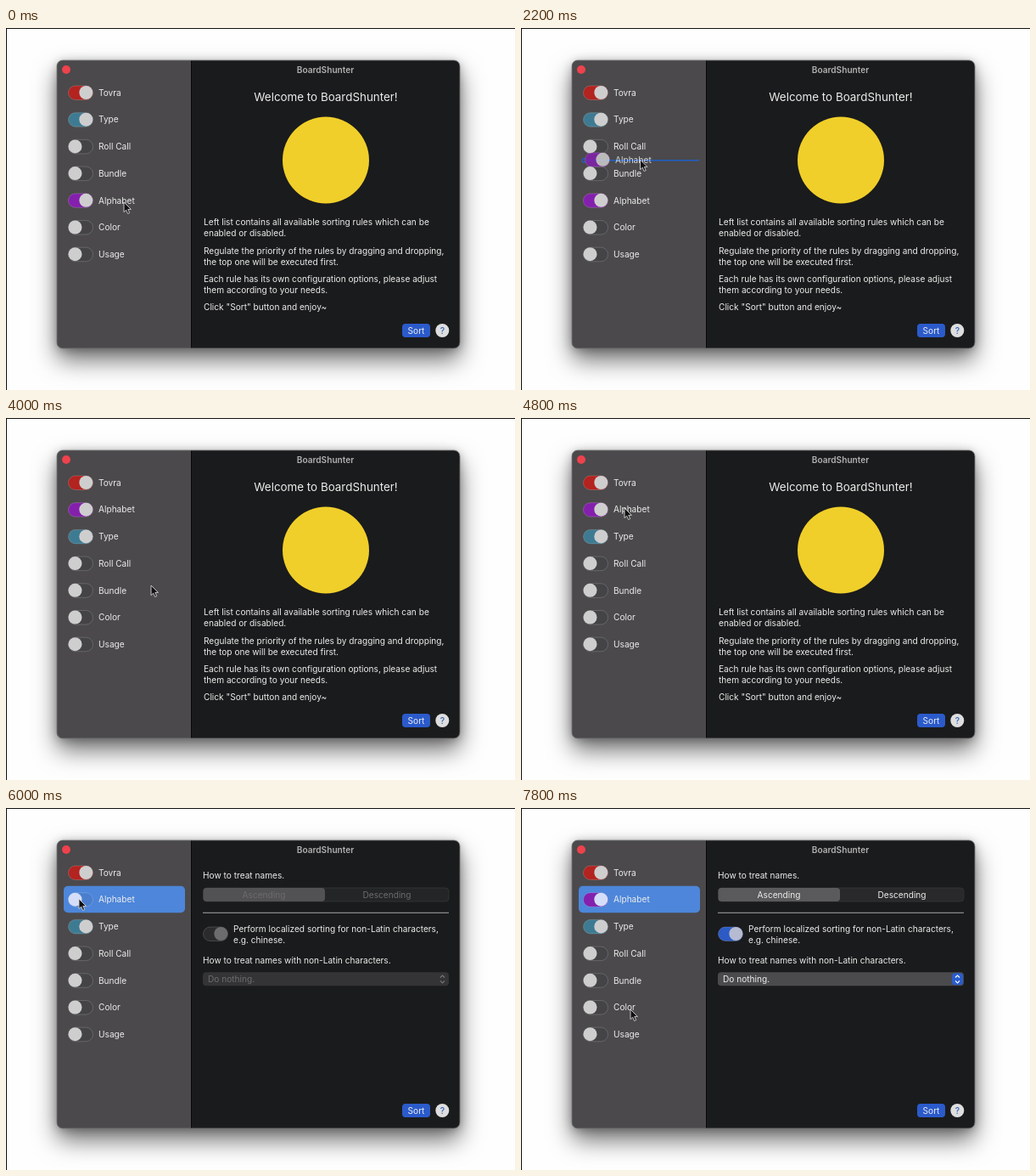
An HTML page for the animation above (8000 ms loop, 600 by 426 pixels).

```html
<!DOCTYPE html>
<html lang="en">
<head>
<meta charset="utf-8">
<style>
html, body { margin: 0; width: 100%; height: 100%; overflow: hidden; background: #fefefe; }
#edge { position: absolute; inset: 0; border: solid #111; border-width: 1px 0 0 1px; }
#window { position: absolute; left: 60px; top: 38px; width: 475px; height: 339px; border-radius: 8px;
  box-shadow: 0 14px 28px rgba(0,0,0,.55), 0 2px 12px rgba(0,0,0,.28); }
svg { position: absolute; left: 0; top: 0; }
text { font-family: Inter, sans-serif; font-size: 10.15px; fill: #ececec; white-space: pre; }
</style>
</head>
<body>
<div id="edge"></div>
<div id="window"></div>
<svg id="stage" width="600" height="426" viewBox="0 0 600 426"></svg>
<script>
const LOOP = 8000, STEP = 200;
const ROW_TOP = 76, ROW_GAP = 31.7;
const DRAG_START = 1600, DROP = 3400, SELECT = 5000, SWITCH_OFF = 5800, SWITCH_ON = 6800;
const GRAB = { x: 139, y: 203 };
const APP = 'BoardShunter';

const RULES = {
  Tovra: '#b3231f', Type: '#3e7b92', 'Roll Call': null, Bundle: null,
  Alphabet: '#8420ad', Color: null, Usage: null
};
const ORDER_BEFORE = Object.keys(RULES);
const ORDER_AFTER = ['Tovra', 'Alphabet', 'Type', 'Roll Call', 'Bundle', 'Color', 'Usage'];

// time, x, y of the pointer tip
const POINTER = [
  [0, 139, 205], [400, 139, 203], [1600, 139, 203], [2800, 142, 107], [3200, 143, 93],
  [3400, 144, 95], [4000, 171, 197], [4800, 122, 106], [5000, 121, 105],
  [5600, 86, 107], [7000, 86, 107], [7800, 129, 237], [8000, 129, 237]
];

function pointerAt(t) {
  const i = POINTER.findIndex(key => key[0] > t);
  const [t0, x0, y0] = POINTER[i - 1], [t1, x1, y1] = POINTER[i];
  const p = (t - t0) / (t1 - t0), e = p * p * (3 - 2 * p);
  return { x: x0 + (x1 - x0) * e, y: y0 + (y1 - y0) * e };
}

const rect = (x, y, w, h, r, fill, more = '') =>
  `<rect x="${x}" y="${y}" width="${w}" height="${h}" rx="${r}" fill="${fill}" ${more}/>`;
const circle = (x, y, r, fill, more = '') =>
  `<circle cx="${x}" cy="${y}" r="${r}" fill="${fill}" ${more}/>`;
const path = (d, more) => `<path d="${d}" ${more}/>`;
// y is the middle of the line
const text = (x, y, s, style = '') => `<text x="${x}" y="${y + 3.7}" style="${style}">${s}</text>`;
const centered = (x, y, s, style = '') => text(x, y, s, 'text-anchor:middle;' + style);

function toggle(x, y, color, knob = '#cfcecf', track = '#444346') {
  return rect(x + .5, y - 8, 29, 16.5, 8.25, color || track, 'stroke="#fff" stroke-opacity=".17"') +
    circle(x + (color ? 21.3 : 8.5), y, 8, knob);
}

function row(name, y, on = true, selected = false) {
  const knob = selected ? '#d4def8' : '#cfcecf';
  return (selected ? rect(68, y - 16, 143, 31.5, 5, '#4d86da') : '') +
    toggle(73, y, on && RULES[name], knob, selected ? '#4b7fcd' : '#444346') +
    text(109, y, name);
}

function sidebar(t, pointer) {
  const order = t < DROP ? ORDER_BEFORE : ORDER_AFTER;
  const switchedOn = t < SWITCH_OFF || t >= SWITCH_ON;
  let out = order.map((name, i) => {
    const own = name === 'Alphabet';
    return row(name, ROW_TOP + i * ROW_GAP, !own || switchedOn, own && t >= SELECT);
  }).join('');

  if (t > DRAG_START && t < DROP) {
    const dx = pointer.x - GRAB.x + .5, dy = pointer.y - GRAB.y;
    const slot = Math.floor((pointer.y - 60.2) / ROW_GAP + .55);
    if (slot < 4) {
      const y = 60.6 + slot * ROW_GAP;
      out += path(`M77 ${y}H210`, 'stroke="#2060c8" stroke-width="1.5"') +
        circle(74.5, y, 2.3, '#4b494b', 'stroke="#2060c8" stroke-width="1.4"');
    }
    out += `<g opacity=".85" transform="translate(${dx} ${dy})">${row('Alphabet', ROW_TOP + 4 * ROW_GAP)}</g>`;
  }
  return out;
}

function welcome() {
  const lines = [
    [228.5, 'Left list contains all available sorting rules which can be'],
    [241.5, 'enabled or disabled.'],
    [262, 'Regulate the priority of the rules by dragging and dropping,'],
    [275, 'the top one will be executed first.'],
    [295.3, 'Each rule has its own configuration options, please adjust'],
    [308, 'them according to your needs.'],
    [328.5, 'Click "Sort" button and enjoy~']
  ];
  return centered(377, 81.8, `Welcome to ${APP}!`, 'font-size:13.4px') +
    circle(377, 155.5, 51, '#f0cf2a') +
    lines.map(([y, s]) => text(233, y, s)).join('');
}

function options(enabled) {
  const ink = enabled ? '' : 'fill:#6c6b6d';
  const arrows = enabled ? '#fff' : '#77767a';
  return text(232, 79.5, 'How to treat names.') +
    rect(232.5, 94, 289.5, 16, 4, enabled ? '#29292b' : '#242526', 'stroke="#343536" stroke-width=".8"') +
    rect(232.5, 94, 143.5, 16, 4, enabled ? '#5a595b' : '#525153') +
    centered(304, 102, 'Ascending', ink) + centered(449, 102, 'Descending', ink) +
    path('M232 123.3H522', 'stroke="#a5a5a6" stroke-width="1"') +
    (enabled ? toggle(232, 148, '#2c5bc5', '#b6bbd2') : toggle(232, 148, '#2b2b2d', '#6c6b6d')) +
    text(268, 142, 'Perform localized sorting for non-Latin characters,') +
    text(268, 155, 'e.g. chinese.') +
    text(232, 179.3, 'How to treat names with non-Latin characters.') +
    rect(232, 193.3, 290, 16, 4, enabled ? '#4b4a4d' : '#343436') +
    text(238, 201.5, 'Do nothing.', ink) +
    (enabled ? rect(508, 194.3, 13, 14, 3.5, '#2a5dcc') : '') +
    path('M512 199.5l2.5-2.5 2.5 2.5M512 203.3l2.5 2.5 2.5-2.5',
      `fill="none" stroke="${arrows}" stroke-width="1.2"`);
}

function frame() {
  return rect(60, 38, 475, 339, 7, '#1a1b1c') +
    path('M218 38H67a7 7 0 0 0-7 7V370a7 7 0 0 0 7 7H218Z', 'fill="#4b494b"') +
    path('M218.5 38V377', 'stroke="#080808"') +
    rect(60, 38, 475, 339, 7, 'none', 'stroke="#747476" stroke-width=".8"') +
    circle(71, 49, 5, '#ee424d') +
    centered(376.5, 48.8, APP, 'font-weight:600;fill:#b1b1b2') +
    rect(467, 348, 33, 16, 4, '#2b5bcb') + centered(483.5, 356, 'Sort') +
    circle(514.3, 356, 8, '#dededf') + centered(514.3, 356, '?', 'font-weight:500;fill:#2f62b5');
}

function cursor({ x, y }) {
  return path('M0 0V11.6L2.7 9.2 4.6 13.5 6.7 12.6 4.8 8.4H8.4Z',
    `transform="translate(${x} ${y})" fill="#111" stroke="#d4d4d4" stroke-width=".9" stroke-linejoin="round"`);
}

const stage = document.getElementById('stage');
let shown = -1;

function render(now) {
  const t = Math.floor(now % LOOP / STEP) * STEP;
  if (t !== shown) {
    shown = t;
    const pointer = pointerAt(t);
    const panel = t < SELECT ? welcome() : options(t < SWITCH_OFF || t >= SWITCH_ON);
    stage.innerHTML = frame() + panel + sidebar(t, pointer) + cursor(pointer);
  }
  requestAnimationFrame(render);
}

const start = performance.now();
render(0);
requestAnimationFrame(function tick() {});
function loop() { render.call(null, performance.now() - start); }
</script>
</body>
</html>
```
